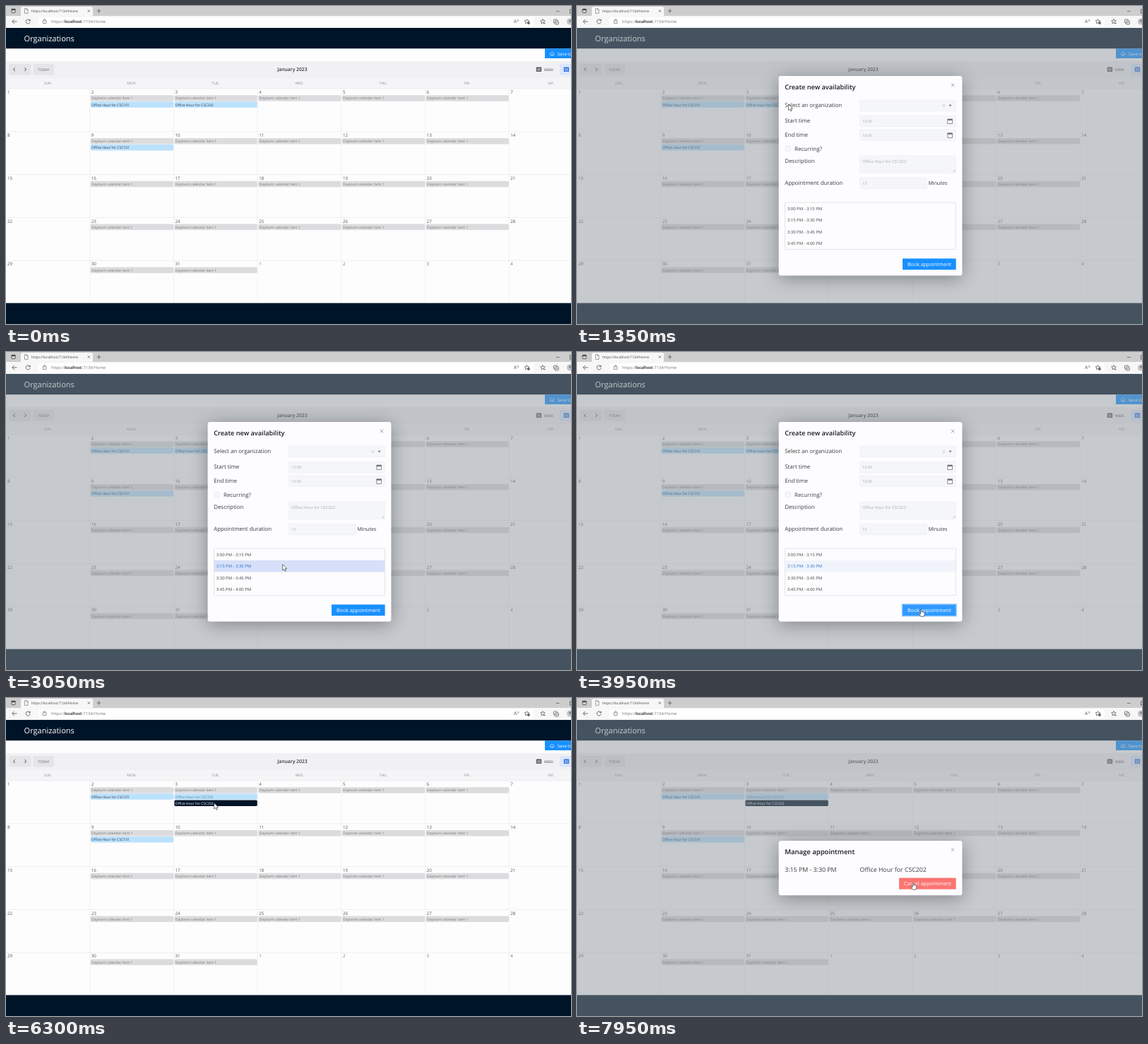
Animation of 800x450 px, one loop 8 s. Source, as an HTML page:

```html
<!DOCTYPE html>
<html lang="en">
<head>
<meta charset="utf-8">
<title>Calendar booking</title>
<style>
html, body { margin: 0; width: 100%; height: 100%; overflow: hidden; background: #fdfdfe; }
svg { display: block; width: 800px; height: 450px; }
text { font-family: "Open Sans", "Noto Sans", sans-serif; text-rendering: geometricPrecision; white-space: pre; }
.shadow { filter: blur(13px); }
</style>
</head>
<body>
<svg id="stage" viewBox="0 0 800 450" xmlns="http://www.w3.org/2000/svg"></svg>
<script>
const LOOP = 8000, STEP = 50;
const NAVY = '#001428', BLUE = '#1890ff';
const COL = 118.72, ROW = 60.8, TOP = 117;

// --- drawing helpers: each returns SVG markup ---
const rect = (x, y, w, h, fill, more = '') =>
  `<rect x="${x}" y="${y}" width="${w}" height="${h}" fill="${fill}" ${more}/>`;
const text = (x, mid, size, str, fill, more = '') =>
  `<text x="${x}" y="${mid + size * 0.36}" font-size="${size}" fill="${fill}" ${more}>${str}</text>`;
const line = (d, color, width = 0.8, more = '') =>
  `<path d="${d}" fill="none" stroke="${color}" stroke-width="${width}" ${more}/>`;
const group = (id, body) => `<g id="${id}">${body}</g>`;
const cross = (x, y, r, color, width) =>
  line(`M${x - r} ${y - r}l${2 * r} ${2 * r}M${x + r} ${y - r}l${-2 * r} ${2 * r}`, color, width);
const BOLD = 'font-weight="600"', MID = 'text-anchor="middle"';

function browser() {
  const ink = '#4a4a4a', url = 'https://localhost:7134/Home';
  return rect(0, 0, 800, 31, '#f7f7f7') + rect(0, 0, 800, 14, '#cdcdce') +
    rect(21, 1, 102, 14, '#f7f7f7', 'rx="2.5"') +
    rect(7.8, 4.2, 5.4, 5.4, 'none', `rx="1" stroke="${ink}" stroke-width=".8"`) + rect(7.8, 4, 5.4, 2, ink) +
    line('M26.4 3.6h2.8l1.8 1.8v5h-4.6zM29.2 3.6v1.8h1.8', '#666', 0.6) +
    text(36, 7, 4.95, url, '#444') + cross(117.3, 7, 1.6, ink, 0.7) +
    line('M128.6 7h5.8M131.5 4.1v5.8', ink, 0.7) + line('M779 7.4h4.5', ink, 0.7) +
    rect(798.6, 5, 5, 5, 'none', `stroke="${ink}" stroke-width=".7"`) +
    rect(46, 16, 701, 12.4, '#fff', 'rx="2.5"') +
    line('M15.5 22H8.8M11.8 18.9l-3.1 3.1 3.1 3.1', ink) +
    line('M33.8 20.6a3 3 0 1 0 .3 2M34.1 18.6v2.2h-2.2', ink) +
    rect(52.2, 20.8, 4.8, 3.8, 'none', 'rx=".6" stroke="#666" stroke-width=".7"') +
    line('M53.3 20.8v-1a1.3 1.3 0 0 1 2.6 0v1', '#666', 0.7) +
    text(64, 22.2, 5.77, url, '#777') +
    text(82.9, 22.2, 5.77, 'localhost', '#333') +
    text(719, 22, 6.6, 'A', ink) + line('M723.8 19.4q1 1 0 2M725 18.6q1.7 1.7 0 3.6', ink, 0.5) +
    star(737.5, 22) + `<circle cx="740" cy="24" r="1.9" fill="#666"/>` +
    star(760, 22) + line('M761.5 24.6h2.4', ink, 0.7) +
    rect(775.5, 19, 5, 5, 'none', `rx="1" stroke="${ink}" stroke-width=".7"`) +
    rect(777.4, 21, 5, 5, '#f7f7f7', `rx="1" stroke="${ink}" stroke-width=".7"`) +
    line('M778.6 23.5h2.6M779.9 22.2v2.6', ink, 0.5) +
    '<circle cx="798.5" cy="22" r="4.5" fill="#c4c4c8"/><circle cx="798.5" cy="21" r="1.7" fill="#8a8a90"/>';
}

function star(x, y) {
  let d = '';
  for (let i = 0; i < 10; i++) {
    const a = i * Math.PI / 5, r = i % 2 ? 1.6 : 3.5;
    d += (i ? 'L' : 'M') + (x + r * Math.sin(a)).toFixed(2) + ' ' + (y - r * Math.cos(a)).toFixed(2);
  }
  return line(d + 'z', '#4a4a4a', 0.7);
}

function gridIcon(x, color) {
  return rect(x, 86.6, 7.4, 6.4, color, 'rx=".8"') +
    line(`M${x + 0.8} 88.8h5.8M${x + 0.8} 90.9h5.8M${x + 2.6} 88v4.4M${x + 4.8} 88v4.4`, '#f0f0f3', 0.5);
}

function item(col, row, slot, label, fill, ink, id) {
  const x = col * COL + 1, y = TOP + row * ROW + 9.2 + slot * 9.1;
  return group(id || `e${col}${row}${slot}`, rect(x, y, COL - 1.4, 8.5, fill, 'rx="1.6"') +
    text(x + 1.4, y + 4.4, 5, label, ink));
}

function calendar() {
  let s = rect(0, 30.5, 800, 420, '#fdfdfe') + rect(0, 30.5, 800, 29.7, NAVY) +
    text(25.6, 46, 11, 'Organizations', '#fff') +
    rect(763, 60.2, 40, 13.8, BLUE) +
    line('M771.2 69.6a1.5 1.5 0 0 1 0-2.8a2.1 2.1 0 0 1 4 0a1.5 1.5 0 0 1 0 2.8zM773.2 70.4v-2.4', '#fff', 0.6) +
    text(780.8, 67.4, 6, 'Save to', '#fff') +
    rect(0, 78, 800, 24, '#f1f1f4') +
    rect(4, 82, 31.5, 15.4, '#e5e5e8', 'rx="1.5"') + rect(38.7, 82, 29.3, 15.4, '#e5e5e8', 'rx="1.5"') +
    line('M12.7 87.4l-2.2 2.3 2.2 2.3M26.4 87.4l2.2 2.3-2.2 2.3', '#333', 0.9) +
    text(53.3, 89.8, 5.1, 'TODAY', '#666', MID) +
    text(405.4, 90, 6.8, 'January 2023', '#333', MID + ' ' + BOLD) +
    gridIcon(750.8, '#555') + text(762, 89.8, 4.9, 'WEEK', '#444') +
    rect(784, 82, 20, 15.4, '#dbe6fb', 'rx="1.5"') + gridIcon(789.8, '#2f6fe4') +
    rect(0, 102, 800, 15, '#f5f5f7');
  ['SUN.', 'MON.', 'TUE.', 'WED.', 'THU.', 'FRI.', 'SAT.'].forEach((d, i) => {
    s += text(i * COL + 59.4, 109, 5, d, '#8a8a8e', MID);
  });
  for (let i = 1; i < 7; i++) s += line(`M${i * COL} 117V420`, '#e9e9ec', 0.6);
  for (let r = 0; r < 5; r++) {
    const y = TOP + r * ROW;
    s += line(`M0 ${y}H800`, '#e6e6e9', 0.6);
    for (let c = 0; c < 7; c++) {
      const n = r * 7 + c + 1, day = n > 31 ? n - 31 : n;
      s += text(c * COL + 2, y + 5, 6.2, day, n > 31 ? '#777' : '#555');
      if (n <= 31 && c > 0 && c < 6) s += item(c, r, 0, 'Dayloom calendar item 1', '#dcdcde', '#777');
    }
  }
  const light = '#bbe1fc', ink = '#24394a';
  return s + item(1, 0, 1, 'Office Hour for CSC101', light, ink) +
    item(2, 0, 1, 'Office Hour for CSC202', light, ink, 'free') +
    item(1, 1, 1, 'Office Hour for CSC101', light, ink) +
    item(2, 0, 2, 'Office Hour for CSC202', NAVY, '#fff', 'booked') +
    rect(0, 420.4, 800, 30, NAVY);
}

const field = (y, w, h, value, size = 5.5) =>
  rect(400.4, y, w, h, '#f5f6f8', 'rx="1" stroke="#ebecef" stroke-width=".6"') +
  text(404, y + Math.min(h / 2, 8), size, value, '#a9acb2');
const calIcon = y => rect(524.8, y - 3, 6.6, 6.4, 'none', 'stroke="#666" stroke-width=".7"') +
  rect(524.8, y - 3.2, 6.6, 1.8, '#666') + line(`M526.4 ${y - 4}v1.4M529.8 ${y - 4}v1.4`, '#666', 0.7);
const shell = (id, y, h) =>
  rect(285.6, y + 4, 259.8, h, '#000', `id="${id}Shadow" class="shadow" opacity=".34" rx="4"`) +
  rect(285.6, y, 259.8, h, '#fdfcfe', `id="${id}Box" rx="3.2"`);

function createDialog() {
  const ink = '#3a3a3e', label = (y, s) => text(294.2, y, 7.9, s, ink);
  const slots = ['3:00 PM - 3:15 PM', '3:15 PM - 3:30 PM', '3:30 PM - 3:45 PM', '3:45 PM - 4:00 PM'];
  const rows = slots.map((s, i) => group('slot' + i,
    rect(295, 278.3 + i * 16.5, 241.2, 16.5, 'none') + text(297.8, 286.4 + i * 16.5, 5.93, s, '#444')));
  return shell('create', 99, 282.4) + group('form',
    text(294.2, 115, 9.2, 'Create new availability', '#1c1c20', BOLD) + cross(532, 112, 2.3, '#888', 0.7) +
    label(140.2, 'Select an organization') + field(133.3, 136, 15.2, '') +
    cross(519.5, 141, 2, '#b4b6ba', 0.6) + '<path d="M526.3 139.8h4.4l-2.2 2.5z" fill="#777"/>' +
    label(162.4, 'Start time') + field(155.3, 136, 15.4, '15:00') + calIcon(163.2) +
    label(182, 'End time') + field(175, 136, 15.4, '16:00') + calIcon(183) +
    rect(294.8, 198, 7.4, 7.4, '#f6f7f9', 'rx="1" stroke="#e2e3e6" stroke-width=".6"') +
    text(308, 202, 7.9, 'Recurring?', ink) +
    label(219.2, 'Description') + field(212, 136, 24.4, 'Office Hour for CSC202', 5.76) +
    line('M532 235l3.4-3.4M534 235l1.4-1.4', '#999', 0.5) +
    label(250.4, 'Appointment duration') + field(243.2, 95, 15.4, '15') +
    text(497.4, 250.6, 7.15, 'Minutes', ink) +
    rows.join('') +
    rect(294.6, 278, 241.8, 66.6, 'none', 'id="list" rx="1" stroke="#dcdde1" stroke-width=".8"')) +
    group('book', rect(460.4, 356.8, 76.8, 17, 'none', `id="wave" stroke="${BLUE}" stroke-width="1.4"`) +
      rect(461, 357.4, 75.6, 15.8, BLUE, 'id="bookFill"') +
      text(498.9, 365.5, 7.1, 'Book appointment', '#fff', MID));
}

function manageDialog() {
  return shell('manage', 202, 77.2) +
    text(294.2, 217.6, 9.5, 'Manage appointment', '#1c1c20', BOLD) + cross(532, 214.6, 2.3, '#888', 0.7) +
    text(294.2, 243, 8.8, '3:15 PM - 3:30 PM', '#3a3a3e') + text(400.6, 243, 8.75, 'Office Hour for CSC202', '#3a3a3e') +
    rect(456, 254.6, 80.6, 16, '#ff4d4f', 'id="cancelFill"') +
    text(496.3, 262.8, 7.12, 'Cancel appointment', '#fff', MID);
}

const arrow = '<path d="M0 0v8.6l2-1.8 1.3 3 1.5-.7-1.3-2.9h2.6z" fill="#fff" stroke="#222" stroke-width=".6"/>';
const hand = '<path d="M-.8 .6q.8-1.2 1.6 0v3q.8-.5 1.4.1q.8-.4 1.4.2q1-.2 1.2.7v2.2l-1 3h-4.4l-2.5-3.6q0-1 1-.8l1.3 1z" fill="#fff" stroke="#222" stroke-width=".6"/>';

document.getElementById('stage').innerHTML = calendar() +
  rect(0, 30.5, 800, 420, '#8d959b', 'id="veil"') +
  group('create', createDialog()) + group('manage', manageDialog()) +
  browser() + group('cursor', group('arrow', arrow) + group('hand', hand));

// --- motion ---
const $ = id => document.getElementById(id);
const set = (id, name, value) => $(id).setAttribute(name, value);
const show = (id, on) => set(id, 'display', on ? 'inline' : 'none');
const clamp = v => Math.min(1, Math.max(0, v));
const ramp = (t, a, b) => clamp((t - a) / (b - a));
const ease = p => p * p * (3 - 2 * p);
const mix = (a, b, p) => `rgb(${a.map((v, i) => Math.round(v + (b[i] - v) * p))})`;

// time, x, y of the pointer tip
const PATH = [
  [50, 790, 192], [350, 299.4, 139], [1400, 299.4, 139], [2150, 335, 208], [2750, 391.6, 300.4],
  [3100, 391.6, 300.4], [3800, 487.4, 364.4], [4400, 487.4, 364.4], [5250, 533, 116],
  [5550, 533, 116], [6200, 294.6, 148.4], [6600, 294.6, 148.4], [7300, 420, 242], [7800, 476, 261.4]
];
function pointer(t) {
  let i = 0;
  while (i < PATH.length - 2 && t >= PATH[i + 1][0]) i++;
  const [t0, x0, y0] = PATH[i], [t1, x1, y1] = PATH[i + 1], p = ease(ramp(t, t0, t1));
  return [x0 + (x1 - x0) * p, y0 + (y1 - y0) * p];
}
const inside = ([x, y], l, t, r, b) => x >= l && x <= r && y >= t && y <= b;

function draw(t) {
  const tip = pointer(t);
  const create = ramp(t, 1250, 1350) * (1 - ramp(t, 5350, 5500));
  const manage = ramp(t, 6450, 6550);
  const done = t >= 4250, dy = done ? 8.25 : 0;

  set('veil', 'opacity', 0.49 * Math.max(create, manage));
  show('create', create > 0);
  set('create', 'opacity', create);
  show('manage', manage > 0);
  set('manage', 'opacity', manage);

  const height = done ? 266 : 282.4;
  set('createBox', 'y', 99 + dy);
  set('createBox', 'height', height);
  set('createShadow', 'y', 103 + dy);
  set('createShadow', 'height', height);
  set('form', 'transform', `translate(0 ${dy})`);
  set('book', 'transform', `translate(0 ${-dy})`);
  set('list', 'height', done ? 50 : 66.6);

  for (let i = 0; i < 4; i++) {
    const shift = done && i > 1 ? -16.5 : 0, y = 278.3 + i * 16.5 + shift + dy;
    const shown = !(done && i === 1), picked = i === 1 && t >= 2850;
    const over = shown && inside(tip, 295, y, 536, y + 16.4);
    show('slot' + i, shown);
    set('slot' + i, 'transform', `translate(0 ${shift})`);
    const [bg, label] = $('slot' + i).children;
    bg.setAttribute('fill', picked ? (over ? '#d7e0f9' : '#f0f4fa') : over ? '#f1f2f5' : 'none');
    label.setAttribute('fill', picked ? '#2a70d2' : '#444');
  }

  set('bookFill', 'fill', mix([24, 144, 255], [64, 160, 255], ramp(t, 3800, 4050)));
  set('wave', 'opacity', t >= 3900 ? 0.5 * (1 - ramp(t, 3900, 4250)) : 0);

  const overCancel = t > 7300 && inside(tip, 456, 254.6, 536.6, 270.6);
  set('cancelFill', 'fill', overCancel ? '#fb7572' : '#ff4d4f');

  const booked = t >= 5600;
  show('booked', booked);
  $('free').lastChild.setAttribute('fill', booked ? '#5f8099' : '#24394a');

  const overBook = create > 0 && inside(tip, 461, 357 - dy, 537, 373 - dy);
  const overClose = create > 0 && inside(tip, 526, 106 + dy, 538, 118 + dy);
  const link = overBook || overClose || overCancel;
  show('cursor', t >= 50);
  set('cursor', 'transform', `translate(${tip[0].toFixed(2)} ${tip[1].toFixed(2)})`);
  show('hand', link);
  show('arrow', !link);
}

const start = performance.now();
function tick() {
  const t = (performance.now() - start) % LOOP;
  draw(Math.floor(t / STEP) * STEP);
  requestAnimationFrame(tick);
}
draw(0);
requestAnimationFrame(tick);
</script>
</body>
</html>
```
